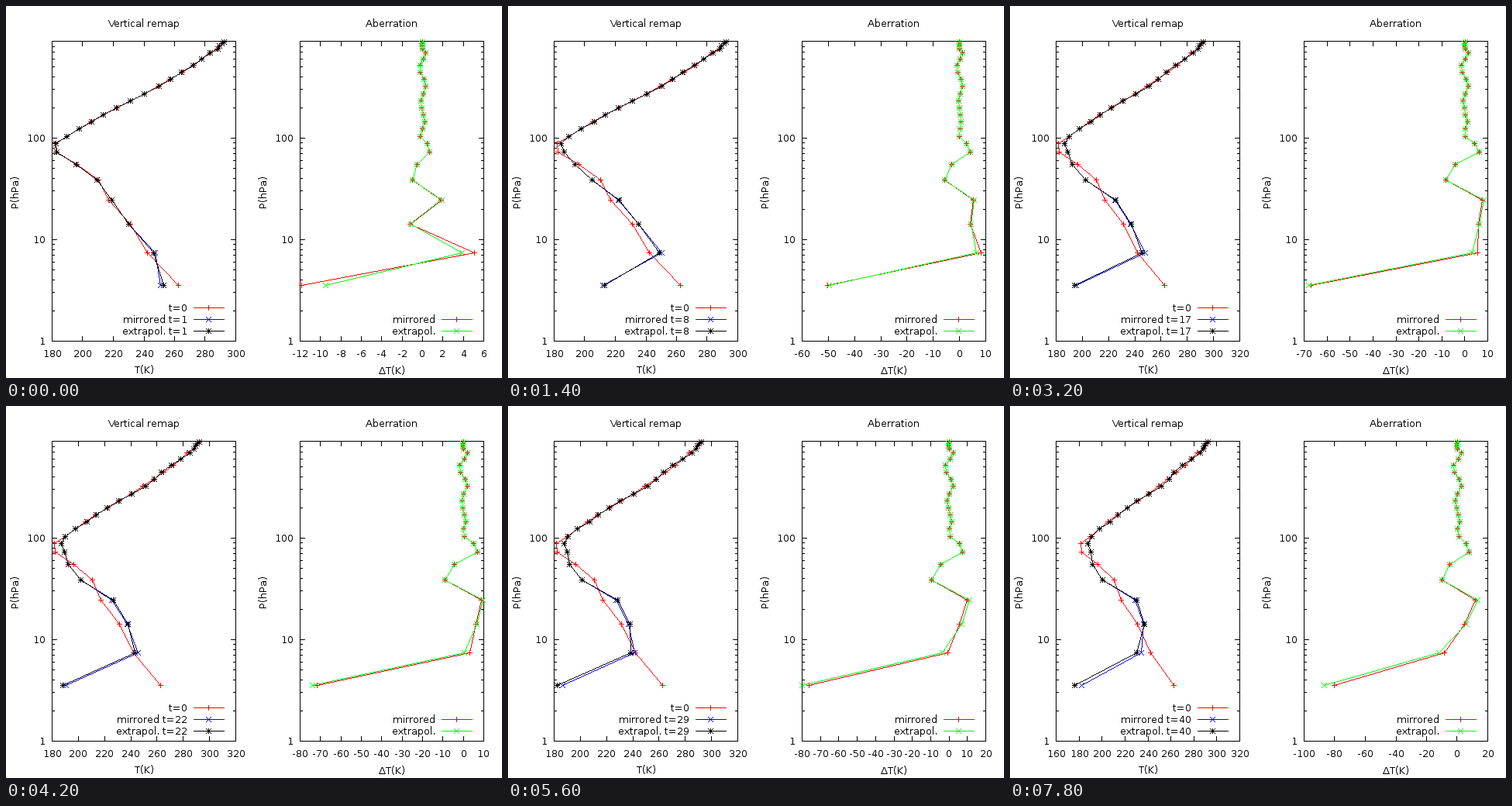
Animation, 640 px wide and 480 px high, one loop 8000 ms. Source, as a matplotlib script:

```python
import math

import numpy as np
import matplotlib.pyplot as plt
from matplotlib.animation import FuncAnimation

plt.rcParams["text.hinting"] = "default"
plt.rcParams["text.hinting_factor"] = 1

W, H, DPI = 640, 480, 100
FONT = dict(family="DejaVu Sans", size=9.6, color="black")
TOP, BOTTOM, DECADE = 45, 432, 131
LEFT, RIGHT = (59, 296), (379, 616)
BLACK, RED, GREEN, BLUE = (0, 0, 0), (255, 0, 0), (0, 255, 0), (0, 0, 255)

# 25 levels, surface first: crowded near the ground, spreading out on top
LEVEL = np.arange(25)
k = LEVEL - 6
LEVEL_Y = np.rint(76 + 9.15 * k + .7 * np.minimum(k, 0) ** 2
                  + 2 * np.maximum(k - 11, 0) ** 2.1)

# Initial temperature through a few key levels
START_T = np.interp(LEVEL, [0, 3, 6, 9, 13, 17, 18, 20, 21, 22, 23, 24],
                    [292.4, 288.1, 272.6, 249.4, 213.3, 181.9, 182.4,
                     210.5, 217, 231.1, 242.3, 262.5])

# Low levels drift in a wave that repeats every five levels
LOW = LEVEL[:16]
WAVE = (np.cos(2 * np.pi * (LOW - 3.9) / 5)
        * np.interp(LOW, [0, 3, 4, 9, 12, 14], [.4, .4, 2.8, 2.7, .6, 1.8]))


def drifts(t):
    """Temperature change of the mirrored and the extrapolated run."""
    def settle(amount, tau):
        return amount * (1 - math.exp(-t / tau))

    root = math.sqrt(t)
    high = [.035 * t - .3, settle(6.5, 15), settle(8, 11), settle(-4.6, 8),
            settle(-10, 10), 1.85 * root, 4.8 * root - .5 * t - 5.5,
            6.3 * root - 1.2 * t, -94.5 * t / (t + 7)]
    mirrored = np.concatenate([WAVE * (t / 40) ** .6, high])
    extrapol = mirrored.copy()
    extrapol[-4:] += [.045 * t, .03 * t, -1.2 - .06 * t, 2.5 - .2175 * t]
    return mirrored, extrapol


def auto_range(lo, hi):
    """Axis limits rounded outwards to whole tick steps, and the step."""
    power = 10 ** math.floor(math.log10(hi - lo))
    room = 20 * power / (hi - lo)
    unit = next((u for limit, u in ((10, .2), (4, .5), (2, 1)) if room > limit), 2)
    step = round(unit * power)
    return math.floor(lo / step) * step, math.ceil(hi / step) * step, step


# Hard-edged drawing on a pixel canvas
def line(img, x0, y0, x1, y1, color=BLACK):
    n = int(max(abs(x1 - x0), abs(y1 - y0), 1)) + 1
    xs = np.rint(np.linspace(x0, x1, n)).astype(int)
    ys = np.rint(np.linspace(y0, y1, n)).astype(int)
    img[ys, xs] = color


def mark(img, x, y, color, shapes):
    x, y, r = int(x), int(y), 3
    if "+" in shapes:
        line(img, x - r, y, x + r, y, color)
        line(img, x, y - r, x, y + r, color)
    if "x" in shapes:
        line(img, x - r, y - r, x + r, y + r, color)
        line(img, x - r, y + r, x + r, y - r, color)


def curve(img, xs, color, shapes):
    pts = list(zip(xs, LEVEL_Y))
    for a, b in zip(pts, pts[1:]):
        line(img, *a, *b, color)
    for p in pts:
        mark(img, *p, color, shapes)


fig = plt.figure(figsize=(W / DPI, H / DPI), dpi=DPI, facecolor="white")
ax = fig.add_axes([0, 0, 1, 1])
base = np.full((H, W, 3), 255, np.uint8)
view = ax.imshow(base, extent=(0, W, H, 0), aspect="auto", interpolation="nearest")
ax.set_xlim(0, W)
ax.set_ylim(H, 0)
ax.axis("off")
live = []


def text(x, y, s, ha="center", va="baseline", **kw):
    return ax.text(x, y, s, ha=ha, va=va, **FONT, **kw)


def key(x, y, color, shapes, label=None):
    line(base, x, y, x + 39, y, color)
    mark(base, x + 19, y, color, shapes)
    if label:
        text(x - 8, y + 5, label, "right")


def panel(span, title, xlabel, label_y):
    x0, x1 = span
    mid = (x0 + x1) / 2 + .5
    for x in span:
        line(base, x, TOP, x, BOTTOM)
    for y in (TOP, BOTTOM):
        line(base, x0, y, x1, y)
    for d in range(3):
        for n in range(1, 10):
            y = round(BOTTOM - DECADE * (d + math.log10(n)))
            if y > TOP:
                size = 6 if n == 1 else 3
                line(base, x0, y, x0 + size, y)
                line(base, x1 - size, y, x1, y)
        text(x0 - 8, BOTTOM - DECADE * d + 5, str(10 ** d), "right")
    text(mid, 27, title)
    text(mid, label_y, xlabel)
    text(x0 - 47, 239, "P(hPa)", va="center", rotation=90)


def x_axis(img, span, lo, hi, step):
    """Draw the ticks and return the mapping from value to pixel."""
    x0, x1 = span

    def to_px(v):
        return np.rint(x0 + (np.asarray(v) - lo) * (x1 - x0) / (hi - lo))

    for v in range(lo, hi + 1, step):
        x = float(to_px(v))
        line(img, x, BOTTOM, x, BOTTOM - 6)
        line(img, x, TOP, x, TOP + 6)
        live.append(text(x + .5, 453, str(v)))
    return to_px


panel(LEFT, "Vertical remap", "T(K)", 474)
panel(RIGHT, "Aberration", "ΔT(K)", 475)
key(242, 389, RED, "+", "t=0")
key(242, 404, BLUE, "x")
key(242, 419, BLACK, "+x")
key(562, 404, RED, "+", "mirrored")
key(562, 419, GREEN, "x", "extrapol.")


def update(frame):
    while live:
        live.pop().remove()
    t = frame + 1
    img = base.copy()
    mirrored, extrapol = drifts(t)
    a, b = START_T + mirrored, START_T + extrapol

    # The warmest layer lies below the visible pressure range
    warmest = 297.5 + .15 * t
    px = x_axis(img, LEFT, *auto_range(min(START_T.min(), a.min(), b.min()), warmest))
    curve(img, px(START_T), RED, "+")
    curve(img, px(a), BLUE, "x")
    curve(img, px(b), BLACK, "+x")

    both = np.concatenate([mirrored, extrapol])
    px = x_axis(img, RIGHT, *auto_range(both.min(), both.max()))
    curve(img, px(mirrored), RED, "+")
    curve(img, px(extrapol), GREEN, "x")

    view.set_data(img)
    live.append(text(234, 409, f"mirrored t={t}", "right"))
    live.append(text(234, 424, f"extrapol. t={t}", "right"))
    return [view, *live]


anim = FuncAnimation(fig, update, frames=40, interval=200, repeat=True,
                     repeat_delay=0, init_func=lambda: update(0), blit=False)
plt.show()
```
